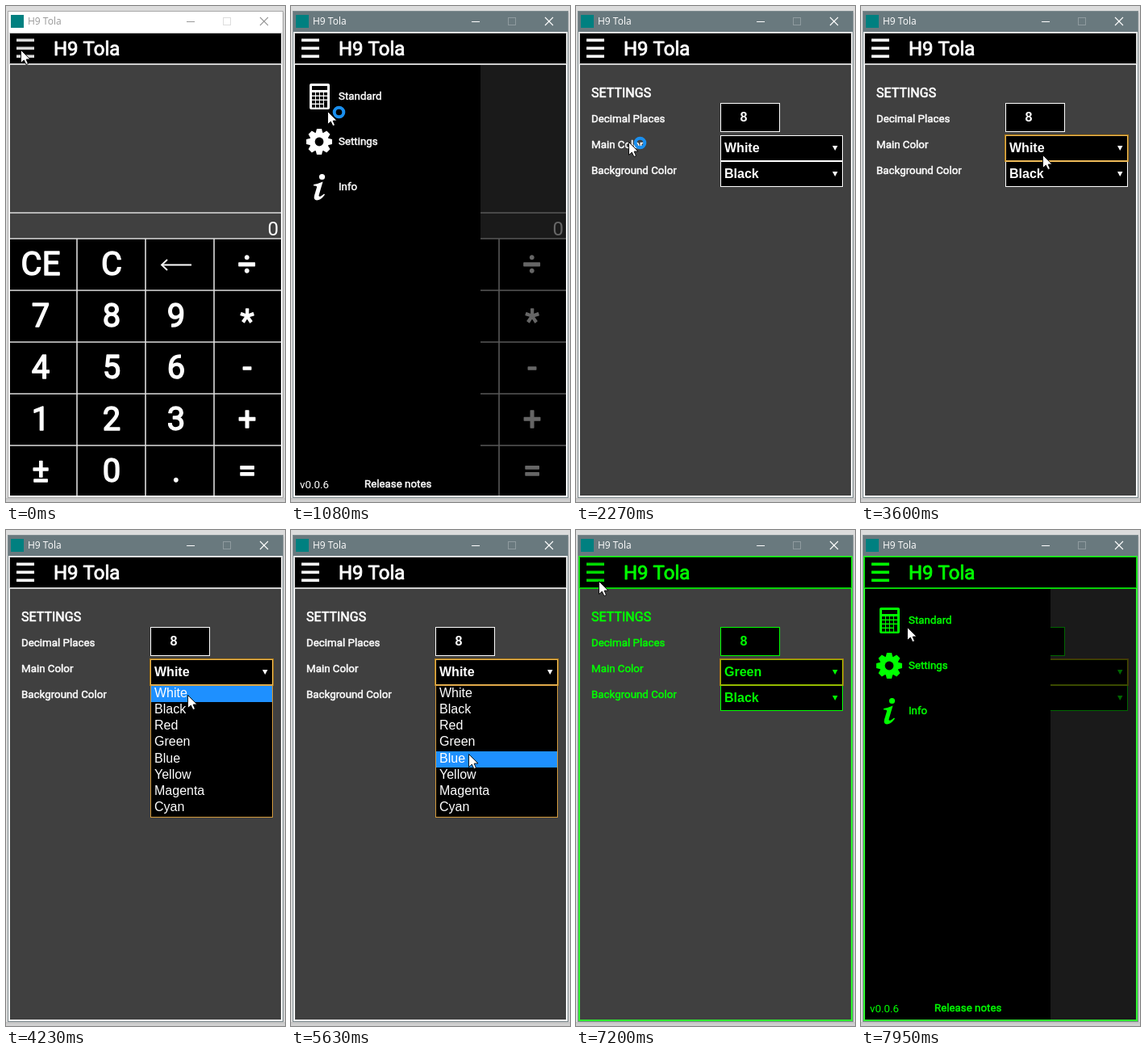
Animation of 346x614 px, one loop 8000 ms. Source, as an HTML page with a canvas:

```html
<!DOCTYPE html>
<html lang="en">
<head>
<meta charset="utf-8">
<title>H9 Tola</title>
<style>
html, body { margin: 0; width: 100%; height: 100%; overflow: hidden; background: #dcdcdc; }
canvas { display: block; }
</style>
</head>
<body>
<canvas id="stage" width="346" height="614"></canvas>
<script>
const ctx = document.getElementById('stage').getContext('2d');
const LOOP = 8000, NAME = 'H9 Tola', PANEL = '#404040';
const UI = 'Roboto, sans-serif', FORM = '"Liberation Sans", Arial, sans-serif';
const COLORS = ['White', 'Black', 'Red', 'Green', 'Blue', 'Yellow', 'Magenta', 'Cyan'];
const ROW = 20.25, LIST_TOP = 193;

// Times of the hard changes
const ACTIVE = 310, MENU1 = 410, SETTINGS = 2270, FOCUS = 3590, OPEN = 3680, PICK = 6180, MENU2 = 7380;

// Pointer legs: first step, last step, number of steps, end point
const LEGS = [
  [880, 1080, 3, 45, 130], [1160, 1620, 6, 82, 181], [1720, 1720, 1, 44, 146],
  [2270, 2270, 1, 65, 168], [2940, 3020, 2, 183, 195], [3220, 3580, 5, 225, 184],
  [3860, 3860, 1, 225, 186], [4230, 4230, 1, 225, 204], [4330, 4430, 2, 225, 213],
  [4610, 5070, 6, 220, 256], [5250, 5350, 2, 220, 269], [5530, 5630, 2, 220, 277],
  [5910, 6090, 3, 220, 262], [6840, 7200, 5, 28, 63], [7950, 7950, 1, 57, 120]
];

function pointerAt(t) {
  let x = 18, y = 54;
  for (const [start, end, n, toX, toY] of LEGS) {
    if (t < start) break;
    const gap = n > 1 ? (end - start) / (n - 1) : 1;
    const k = Math.min(n, Math.floor((t - start) / gap + 1e-6) + 1) / n;
    x += (toX - x) * k;
    y += (toY - y) * k;
  }
  return { x: Math.round(x), y: Math.round(y) };
}

function box(color, x, y, w, h) {
  ctx.fillStyle = color;
  ctx.fillRect(x, y, w, h);
}

function frame(color, x, y, w, h, width = 1) {
  ctx.strokeStyle = color;
  ctx.lineWidth = width;
  ctx.strokeRect(x, y, w, h);
}

function line(color, width, ...pts) {
  ctx.strokeStyle = color;
  ctx.lineWidth = width;
  ctx.beginPath();
  for (let i = 0; i < pts.length; i += 2) ctx.lineTo(pts[i], pts[i + 1]);
  ctx.stroke();
}

function disc(color, x, y, r) {
  ctx.fillStyle = color;
  ctx.beginPath();
  ctx.arc(x, y, r, 0, 7);
  ctx.fill();
}

function text(str, x, y, font, color, align = 'left') {
  ctx.font = font;
  ctx.textAlign = align;
  ctx.fillStyle = color;
  ctx.fillText(str, x, y);
}

// Regular Roboto thickened by a thin outline
function heavy(str, x, y, size, color, align) {
  text(str, x, y, `${size}px ${UI}`, color, align);
  ctx.strokeStyle = color;
  ctx.lineWidth = size / 28;
  ctx.lineJoin = 'round';
  ctx.strokeText(str, x, y);
  ctx.lineJoin = 'miter';
}

function drawWindow(active) {
  box('#dcdcdc', 0, 0, 346, 614);
  box('#c6c6c6', 0, 609, 346, 2);
  box('#d0d0d0', 0, 611, 346, 3);
  box('#cccccc', 344, 8, 1, 602);
  frame(active ? '#7d8a8e' : '#a8a8a8', 2.5, 6.5, 341, 602);
  box(active ? '#69797e' : '#ffffff', 3, 7, 340, 25);
  box('#008080', 6, 11, 16, 16);
  const ink = active ? '#ffffff' : '#999999';
  text(NAME, 27, 23, '12px "Open Sans", sans-serif', ink);
  line(ink, 1, 224, 19.5, 234, 19.5);
  frame(active ? '#8f9b9f' : '#dddddd', 269.5, 14.5, 9, 9);
  line(ink, 1.1, 315, 14, 325, 24);
  line(ink, 1.1, 325, 14, 315, 24);
}

function drawHeader(fg, hover) {
  box('#000000', 4, 33, 338, 39);
  ctx.globalAlpha = hover ? 0.85 : 1;
  for (const y of [41, 51, 61]) box(fg, 13, y - 0.5, 22, 3.6);
  ctx.globalAlpha = 1;
  heavy(NAME, 59, 61, 24, fg);
}

function drawBorder(fg) {
  ctx.globalAlpha = 0.78;
  box(fg, 5, 71, 336, 2);
  frame(fg, 4, 33, 338, 574, 2);
  ctx.globalAlpha = 1;
}

function drawCalculator() {
  const fg = '#ffffff', rule = '#dddddd';
  box(PANEL, 5, 72, 336, 216);
  box('#000000', 5, 288, 336, 318);
  for (const y of [256, 288, 352, 416, 480, 544]) line(rule, 1.6, 5, y, 341, y);
  for (const x of [88, 173, 258]) line(rule, 1.6, x, 288, x, 606);
  text('0', 338, 284, `24px ${UI}`, fg, 'right');
  const rows = ['CE C  ÷', '7 8 9 *', '4 5 6 -', '1 2 3 +', '± 0 . ='];
  const centers = [43, 131, 211, 299];
  rows.forEach((row, r) => row.split(' ').forEach((key, c) => {
    const drop = key === '*' ? 7 : 0;
    if (key) heavy(key, centers[c], 333 + r * 64 + drop, 40, fg, 'center');
  }));
  line(fg, 1.8, 193, 320.5, 230, 320.5);
  line(fg, 1.8, 200, 314, 193, 320.5, 200, 327);
}

function drawSelect(label, y, fg) {
  box('#000000', 179, y, 152, 32);
  frame(fg, 179.5, y + 0.5, 151, 31);
  text(label, 184, y + 21, `bold 16px ${FORM}`, fg);
  ctx.beginPath();
  ctx.moveTo(318, y + 13);
  ctx.lineTo(324.5, y + 13);
  ctx.lineTo(321.25, y + 19);
  ctx.fill();
}

function drawList(pointerY) {
  box('#000000', 179, 192, 152, 164);
  frame('#d39a3c', 179.5, 192.5, 151, 163);
  const row = Math.max(0, Math.floor((pointerY - LIST_TOP) / ROW));
  box('#1e90ff', 180, Math.round(LIST_TOP + row * ROW), 150, 20);
  COLORS.forEach((name, i) =>
    text(name, 184, Math.round(207 + i * ROW - 0.3), `16px ${FORM}`, '#ffffff'));
}

function drawSettings(t, fg, pointerY) {
  box(PANEL, 5, 72, 336, 534);
  heavy('SETTINGS', 19, 113, 16, fg);
  ['Decimal Places', 'Main Color', 'Background Color'].forEach((label, i) =>
    heavy(label, 19, 144 + i * 32, 13.33, fg));
  box('#000000', 179, 120, 74, 36);
  frame(fg, 179.5, 120.5, 73, 35);
  text('8', 208, 143, `bold 16px ${FORM}`, fg, 'center');
  drawSelect('Black', 192, fg);
  drawSelect(t < PICK ? 'White' : 'Green', 160, fg);
  if (t >= FOCUS) frame('rgba(229,151,0,.65)', 179, 160, 152, 32, 2);
  if (t >= OPEN && t < PICK) drawList(pointerY);
}

function drawCalcIcon(fg) {
  ctx.fillStyle = fg;
  ctx.beginPath();
  ctx.roundRect(23, 96, 25, 32, 2);
  ctx.fill();
  box('#000000', 26, 99, 19, 5);
  for (let r = 0; r < 4; r++)
    for (let c = 0; c < 4; c++)
      if (c < 3 || r < 2) box('#000000', 26 + c * 5, 107 + r * 5, 4, 3.6);
  box('#000000', 41, 117, 4, 8.6);
}

function drawGear(fg) {
  ctx.save();
  ctx.translate(35, 168);
  disc(fg, 0, 0, 12);
  for (let i = 0; i < 8; i++) {
    ctx.beginPath();
    ctx.moveTo(-4.6, -10);
    ctx.lineTo(-3, -16);
    ctx.lineTo(3, -16);
    ctx.lineTo(4.6, -10);
    ctx.fill();
    ctx.rotate(Math.PI / 4);
  }
  ctx.restore();
  disc('#000000', 35, 168, 5.4);
}

function drawInfoIcon(fg) {
  disc(fg, 38.5, 211.5, 3.6);
  ctx.fillStyle = fg;
  ctx.beginPath();
  ctx.moveTo(28, 221);
  ctx.quadraticCurveTo(34, 220, 39.5, 217.5);
  ctx.lineTo(34.5, 234.5);
  ctx.quadraticCurveTo(34.5, 238, 41, 232.5);
  ctx.lineTo(42, 233.5);
  ctx.quadraticCurveTo(37, 240.5, 32, 240.5);
  ctx.quadraticCurveTo(27.5, 240, 29, 234.5);
  ctx.lineTo(32, 224.5);
  ctx.quadraticCurveTo(32.5, 222, 28, 222.5);
  ctx.fill();
}

function drawMenu(fg, shift) {
  box('rgba(0,0,0,.6)', 5, 73, 336, 533);
  ctx.save();
  ctx.beginPath();
  ctx.rect(5, 73, 336, 533);
  ctx.clip();
  ctx.translate(shift, 0);
  box('#000000', 5, 73, 230, 533);
  drawCalcIcon(fg);
  drawGear(fg);
  drawInfoIcon(fg);
  ['Standard', 'Settings', 'Info'].forEach((label, i) =>
    heavy(label, 59, 116 + i * 56, 13.33, fg));
  text('v0.0.6', 11, 597, `13.33px ${UI}`, fg);
  heavy('Release notes', 91, 596, 13.33, fg);
  ctx.restore();
}

function drawPointer({ x, y }, busy) {
  if (busy) {
    ctx.strokeStyle = '#1a8fee';
    ctx.lineWidth = 4;
    ctx.beginPath();
    ctx.arc(x + 14.5, y + 1.5, 5.8, 0, 7);
    ctx.stroke();
  }
  const tip = [0, 0, 0, 16, 3.8, 12.6, 6.4, 18, 9, 17, 6.6, 11.6, 11.5, 11.4];
  ctx.beginPath();
  for (let i = 0; i < tip.length; i += 2) ctx.lineTo(x + 0.5 + tip[i], y + 0.5 + tip[i + 1]);
  ctx.closePath();
  ctx.fillStyle = '#ffffff';
  ctx.fill();
  ctx.strokeStyle = '#000000';
  ctx.lineWidth = 0.9;
  ctx.stroke();
}

function draw(t) {
  const fg = t < PICK ? '#ffffff' : '#00ff00';
  const pointer = pointerAt(t);
  drawWindow(t >= ACTIVE);
  drawHeader(fg, pointer.x < 40 && pointer.y < 72);
  if (t < SETTINGS) drawCalculator();
  else drawSettings(t, fg, pointer.y);
  const opened = t >= MENU2 ? MENU2 : t >= MENU1 && t < SETTINGS ? MENU1 : null;
  if (opened !== null) drawMenu(fg, t < opened + 100 ? -115 : 0);
  drawBorder(fg);
  drawPointer(pointer, t >= MENU1 && t < 2940);
}

const begin = performance.now();
function tick() {
  draw((performance.now() - begin) % LOOP);
  requestAnimationFrame(tick);
}
tick();
</script>
</body>
</html>
```
